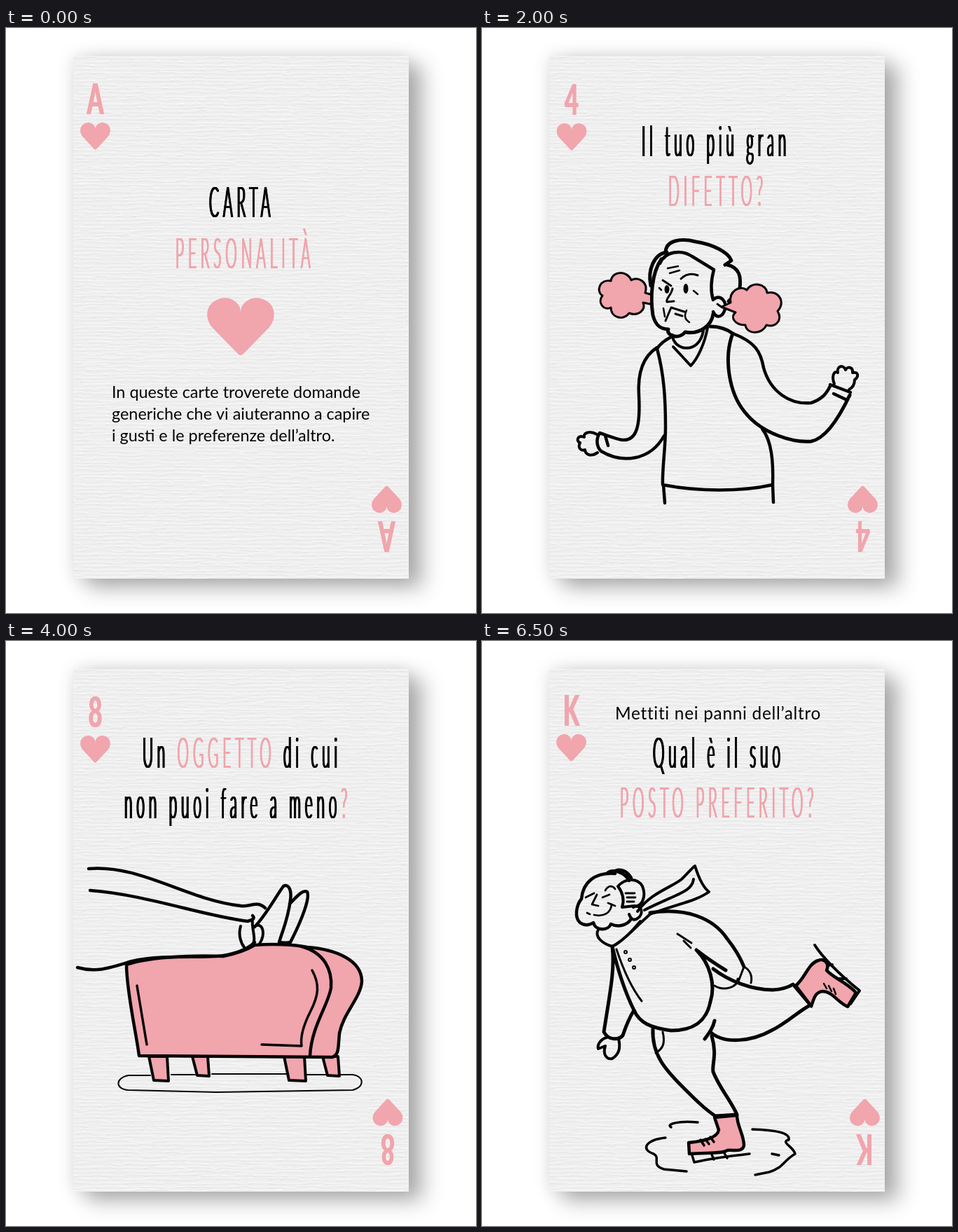
Write an HTML page with a canvas that moves like this. It is 671 px wide and 835 px high and loops after 7000 ms.

```html
<!DOCTYPE html>
<html lang="it">
<head>
<meta charset="utf-8">
<title>Carta personalità</title>
<style>
html, body { margin: 0; width: 100%; height: 100%; overflow: hidden; background: #fff; }
canvas { display: block; }
</style>
</head>
<body>
<canvas id="stage" width="671" height="835"></canvas>
<script>
const W = 671, H = 835, PINK = '#f1a5ad', BLACK = '#050505', PAPER = '#efefef';
const LOOP = 7000;
const ctx = document.getElementById('stage').getContext('2d');
const HEART = new Path2D('M48 82C46 82 44 80 42 78L8 43C-3 31 -2 14 9 6C22 -4 40 -1 47 14L48 20L49 14C56 -1 74 -4 87 6C98 14 99 31 88 43L54 78C52 80 50 82 48 82Z');

function makePaper() {
  const c = document.createElement('canvas');
  c.width = W; c.height = H;
  const g = c.getContext('2d');
  let seed = 11;
  const rnd = () => (seed = (seed * 16807) % 2147483647) / 2147483647;
  g.fillStyle = '#fff';
  g.fillRect(0, 0, W, H);
  g.fillStyle = PAPER;
  for (const [dx, dy, blur, alpha] of [[0, 0, 24, 0.12], [20, 13, 28, 0.3]]) {
    g.shadowColor = `rgba(0,0,0,${alpha})`;
    g.shadowBlur = blur;
    g.shadowOffsetX = dx;
    g.shadowOffsetY = dy;
    g.fillRect(96, 40, 479, 746);
  }
  g.shadowColor = 'transparent';
  g.beginPath();
  g.rect(96, 40, 479, 746);
  g.clip();
  // laid-paper grain: short wavy light and dark streaks
  for (let y = 40; y < 790; y += 5.5) {
    for (let x = 80; x < 575;) {
      const len = 12 + rnd() * 30, yy = y + rnd() * 3;
      for (const [dy, col] of [[0, 'rgba(255,255,255,.35)'], [2, 'rgba(200,200,200,.13)']]) {
        g.strokeStyle = col;
        g.lineWidth = 1.2 + rnd();
        g.beginPath();
        g.moveTo(x, yy + dy);
        g.quadraticCurveTo(x + len / 2, yy + dy + rnd() * 4 - 2, x + len, yy + dy + rnd() * 2 - 1);
        g.stroke();
      }
      x += len * 0.8;
    }
  }
  return c;
}

function ink(d, w = 4, fill) {
  const p = new Path2D(d);
  if (fill) { ctx.fillStyle = fill; ctx.fill(p); }
  ctx.strokeStyle = BLACK;
  ctx.lineWidth = w;
  ctx.stroke(p);
}

function oval(x, y, rx, ry = rx, w = 3, fill, turn = 0) {
  ctx.beginPath();
  ctx.ellipse(x, y, rx, ry, turn, 0, 7);
  if (fill) { ctx.fillStyle = fill; ctx.fill(); }
  if (w) { ctx.strokeStyle = BLACK; ctx.lineWidth = w; ctx.stroke(); }
}

const dot = (x, y, rx, ry = rx) => oval(x, y, rx, ry, 0, BLACK);

function peace(x, y, r, w) {
  oval(x, y, r, r, w);
  const k = r * 0.72;
  ink(`M${x} ${y - r}V${y + r}M${x - k} ${y + k}L${x} ${y + r * 0.1}L${x + k} ${y + k}`, w);
}

function heart(x, y, sx, sy) {
  ctx.save();
  ctx.translate(x, y);
  ctx.scale(sx, sy);
  ctx.fillStyle = PINK;
  ctx.fill(HEART);
  ctx.restore();
}

// condensed hand lettering: thin face, one fixed narrowing, thickened sideways
const NARROW = 0.34;

function lettering(x, y, ...runs) {
  ctx.font = '300 61px Lato, sans-serif';
  ctx.letterSpacing = '17.4px';
  ctx.textAlign = 'left';
  for (const [text, color, fat] of runs) {
    ctx.fillStyle = color;
    for (let d = -fat; d <= fat + 0.01; d += fat / 3) {
      ctx.save();
      ctx.translate(x + d, y);
      ctx.scale(NARROW, 1);
      ctx.fillText(text, 0, 0);
      ctx.restore();
    }
    x += ctx.measureText(text).width * NARROW;
  }
  ctx.letterSpacing = '0px';
}

const black = t => [t, BLACK, 0.95];
const pink = t => [t, PINK, 0.75];

function body(text, x, y, size = 23.4, gap = 0) {
  ctx.font = `400 ${size}px Lato, sans-serif`;
  ctx.letterSpacing = gap + 'px';
  ctx.textAlign = 'left';
  ctx.fillStyle = BLACK;
  ctx.fillText(text, x, y);
  ctx.letterSpacing = '0px';
}

const hint = (x, y) => body('Mettiti nei panni dell’altro', x, y, 24.4, 0.7);

function corner(rank, x, y, flip) {
  ctx.save();
  ctx.translate(x, y);
  if (flip) ctx.rotate(Math.PI);
  heart(-21.5, 0, 0.448, 0.47);
  ctx.font = '700 61px Lato, sans-serif';
  ctx.textAlign = 'center';
  ctx.fillStyle = PINK;
  ctx.scale(0.55, 1);
  for (const d of [-1.5, 0, 1.5]) ctx.fillText(rank, d, -12);
  ctx.restore();
}

function ace() {
  lettering(290, 270, black('CARTA'));
  lettering(242, 343, pink('PERSONALITÀ'));
  heart(287, 385, 1, 1);
  body('In queste carte troverete domande', 151, 528);
  body('generiche che vi aiuteranno a capire', 151, 559);
  body('i gusti e le preferenze dell’altro.', 151, 590);
}

function armchair() {
  ink('M203 259C160 262 130 300 131 350C132 385 142 410 152 426M192 381L190 406M373 360L375 392', 3);
  ink('M290 519C250 514 215 502 175 501C150 499 138 480 139 458C141 425 160 405 190 406C225 409 260 426 300 429', 3);
  oval(290, 474, 45, 46);
  oval(504, 455, 38);
  ink('M377 398C425 394 475 404 514 417', 3);
  ink('M304 420C345 395 395 400 425 420C437 428 446 436 455 442', 4.5);
  ink('M214 284C190 305 180 345 187 375C195 400 225 408 250 398C265 392 275 385 282 379', 4.5);
  ink('M222 329C232 335 238 344 238 352C252 362 268 364 279 362M238 352L228 356', 3.5);
  ink('M280 362C282 352 293 350 298 357C302 364 300 370 306 380C302 382 299 378 296 374C296 382 300 388 294 389C288 388 286 382 284 386C278 382 277 372 280 362', 3.5);
  ink('M214 280C200 280 196 266 206 260C194 250 198 240 210 236C204 222 212 208 224 206C226 194 236 190 245 194C246 178 264 174 274 183C290 172 312 180 313 192C330 190 336 208 326 218C334 226 328 236 326 240', 4.5);
  ink('M326 240C331 255 330 272 318 278C308 284 296 284 284 283C265 284 240 280 233 268M235 240C222 232 216 248 222 258C226 266 232 270 235 262', 3.5);
  ink('M236 240C242 232 240 222 252 222C262 236 280 230 290 222C302 220 312 218 318 228M253 240L263 239M311 237L324 235', 3);
  oval(272, 239, 9, 9, 2.5);
  oval(301, 238, 10, 10, 2.5);
  dot(277, 238, 3, 4); dot(304, 236, 3, 4); dot(232, 265, 4);
  ink('M264 230L280 228M293 222L306 230M290 246L297 262L286 255M279 271L280 261L299 265', 3);
  ink('M216 280C212 296 225 306 238 300C235 316 255 325 268 318C275 330 292 330 298 318M316 320C330 318 342 304 338 290C348 284 344 276 338 274L324 275', 4);
  ink('M300 328L304 352L312 344C318 360 328 360 326 344L318 326M302 282C307 292 303 302 306 312M294 284L304 300', 3);
  oval(308, 320, 11, 8);
  ink('M338 274C350 292 358 312 364 335C366 348 360 360 354 368C364 378 372 390 378 404', 5);
  ink('M344 280C368 292 388 310 412 324M364 356C390 360 415 352 429 338', 3.5);
  ink('M398 241C414 266 424 288 423 312', 3.5);
  ink('M413 324C412 312 424 308 430 311C440 308 440 316 437 322C442 330 436 338 428 342C426 334 424 330 420 328', 3.5);
  ink('M367 202C372 194 392 190 398 193L412 236C405 242 386 246 380 244Z', 4, PINK);
  ink('M375 200L387 242M383 197L395 242M391 195L404 239', 2.5);
  ink('M222 110C226 124 232 134 238 143M243 149C252 160 262 166 273 169', 2);
  ctx.setLineDash([20, 11]);
  ink('M339 200L357 202M409 204C440 206 462 186 474 158', 2.5);
  ink('M473 150C478 106 460 72 437 73C415 76 407 100 415 118C424 140 450 152 480 154', 4);
  ctx.setLineDash([]);
  ink('M450 146C460 152 470 154 491 153M499 152L513 151', 2);
  oval(515, 141, 6, 11, 3, PINK, -0.6);
  oval(525, 137, 5, 11, 3, PINK, -0.1);
  oval(528, 150, 13, 7, 3, PINK, -0.1);
  lettering(181, 614, black('Cosa ti '), pink('INFASTIDISCE'));
  lettering(223, 685, black('maggiormente'), pink('?'));
}

function fury() {
  ink('M262 321C262 302 285 300 305 305C330 309 352 320 356 332L347 338M264 320C246 322 236 345 241 368M350 338C368 342 370 355 368 372C364 380 358 384 352 390', 5);
  ink('M256 330C242 350 240 385 244 410C248 426 256 430 266 430C262 438 280 446 290 434C310 438 328 425 330 408', 5);
  ink('M254 336C262 318 285 316 300 326L331 345C327 360 326 375 330 388C340 378 352 392 346 404C342 414 334 414 330 405', 4.5);
  ink('M258 360L270 368M284 358C292 350 300 350 308 353M272 372C270 382 262 386 264 391L274 390M262 418L270 399L289 405M276 408L286 411M336 394L343 399', 3);
  ink('M265 343L280 340M268 350L282 346M259 400L261 412M302 375L308 380M292 403C288 412 290 416 296 420M253 371L256 374', 2.5);
  dot(264, 373, 3.5, 6); dot(291, 372, 3.5, 7);
  ink('M240 380L233 378C238 362 222 354 213 360C208 346 186 346 184 361C168 358 162 376 172 382C164 392 174 404 184 399C184 414 202 418 210 407C224 412 234 402 230 392L240 394', 3, PINK);
  ink('M342 398L355 392C352 376 368 366 378 374C384 362 406 364 407 378C424 374 434 392 422 404C430 418 418 428 406 424C400 438 378 438 376 424C360 424 354 412 362 406Z', 3, PINK);
  ink('M272 438C272 460 310 468 316 432M273 455L298 482C308 472 318 450 322 428');
  ink('M272 440C262 445 254 450 250 458C260 495 262 530 262 570C262 600 257 630 258 652C310 662 370 662 415 652M259 652L261 678M415 652L416 677', 4.5);
  ink('M250 456C228 470 222 495 224 525C226 565 222 590 200 588C190 586 180 582 168 578C162 588 164 598 170 604C200 622 240 618 260 582M176 582L180 596', 4.5);
  ink('M164 580C154 574 144 578 146 584C136 580 134 590 140 592C136 600 142 604 147 602C148 610 156 612 165 606');
  ink('M326 426C340 426 350 430 358 436C345 470 352 520 375 548C400 580 445 592 470 590C490 586 508 560 525 524', 5);
  ink('M358 436C390 448 398 462 402 485C412 520 440 538 470 535C485 530 492 522 497 511M497 509L526 520M502 522L519 530M400 572C414 590 416 620 415 652', 4.5);
  ink('M503 508C499 498 502 488 508 492C506 482 516 480 519 488C522 482 530 484 529 492C538 490 538 498 532 502C532 510 528 514 524 516');
  lettering(228, 183, black('Il tuo più gran'));
  lettering(266, 254, pink('DIFETTO?'));
}

function hippie() {
  ink('M292 176C280 205 268 240 249 258C260 266 272 268 279 266C276 280 270 288 262 293C285 300 302 296 311 285', 4.5);
  ink('M302 172C300 195 300 210 302 230C304 250 312 258 322 262C334 270 345 250 360 262C380 268 396 250 398 220M298 200C286 196 284 214 288 222C292 230 298 230 302 226M400 178L402 248M388 292C396 300 404 302 410 300L406 288', 3.5);
  ink('M286 150C288 120 315 102 345 102C375 102 402 122 407 160M345 121L353 128', 4.5);
  ink('M415 185C430 175 440 190 439 215C440 250 446 280 454 297L444 309L412 292C412 265 404 240 410 210Z', 4.5, PINK);
  ink('M287 148C315 146 332 128 354 128C380 130 400 142 407 160L411 184C380 160 325 160 289 174Z', 4, PINK);
  ink('M408 174C420 170 424 180 415 185', 4, PINK);
  peace(347, 145, 12, 2);
  ink('M295 222L292 246M397 224L396 252', 2.5);
  dot(292, 254, 7.5); dot(396, 260, 7.5);
  dot(327, 188, 5, 9); dot(370, 188, 5, 9);
  ink('M316 177C322 170 328 170 334 173M362 173C368 168 376 170 381 175M345 213C353 218 364 211 356 203L348 201', 3);
  ink('M311 188L318 190M311 194L318 194M384 190L392 188M384 194L391 194M328 216L324 232M374 216L379 232', 2);
  ink('M329 230C340 222 360 222 370 230C362 236 340 236 329 230Z', 2.5, BLACK);
  ink('M311 258L311 292M383 258L384 292M303 298C320 322 372 322 390 300', 3.5);
  ink('M303 298C300 330 320 360 338 360C365 358 385 330 391 298', 6);
  peace(337, 393, 30, 3.5);
  ink('M303 298C270 298 248 310 238 330C225 350 216 370 210 390M176 304L210 388L215 417M145 314C152 350 158 400 164 440C168 470 180 485 198 484C225 480 250 440 266 420M268 390L266 425C270 460 268 490 268 524', 5);
  ink('M144 316C155 306 168 304 180 304M142 308C134 290 134 276 146 268L131 240C136 234 142 238 146 245L152 262L151 240C158 234 162 240 161 248L162 266C176 262 186 268 186 278C184 290 178 292 174 303M152 278C156 268 172 272 168 282C162 290 152 288 156 294', 4);
  ink('M436 306C470 320 476 360 476 400L477 522M427 392L429 410L440 402M429 408C426 440 426 490 427 526', 5);
  lettering(255, 619, black('In che cosa'));
  lettering(285, 691, pink('CREDI?'));
}

function footstool() {
  ink('M206 620H175C155 624 156 640 175 641L300 644C380 643 450 642 495 641C512 636 512 622 495 619H478M426 619H457M294 618H400M236 619H270', 2);
  for (const [x, w, y] of [[204, 28, 627], [266, 24, 620], [397, 31, 627], [452, 24, 620]])
    ink(`M${x} 593L${x + 7} ${y}L${x + w} ${y + 1}L${x + w - 2} 593Z`, 4, PINK);
  ink('M172 462C200 452 260 448 310 450C330 446 345 440 355 434C380 432 410 433 430 437C470 440 508 455 508 486C506 510 482 530 476 560C474 580 476 590 466 594L190 592C186 560 172 500 172 462Z', 4.5, PINK);
  ink('M422 436C455 445 466 470 464 495C460 520 436 550 434 592', 4.5);
  ink('M437 470C448 490 447 505 434 530C424 550 420 565 422 578L365 576M187 492L201 576', 3.5);
  ink('M118 325C190 318 260 370 335 378C348 380 358 370 370 381M120 356C200 362 280 392 345 400C352 398 356 396 352 392M102 466C130 474 150 466 180 457C220 448 270 452 300 450C325 448 345 440 355 430', 4.5);
  ink('M335 407C331 420 336 432 340 437M352 397C350 410 358 425 352 434M358 406C368 404 370 420 362 432', 4);
  ink('M405 375C415 365 424 354 430 358C434 366 424 395 406 430C400 432 394 430 390 430', 4.5);
  ink('M355 408C372 390 385 365 396 350C404 346 408 356 406 370C402 400 394 415 390 430', 4.5);
  lettering(195, 181, black('Un '), pink('OGGETTO'), black(' di cui'));
  lettering(169, 253, black('non puoi fare a meno'), pink('?'));
}

function coffee() {
  ink('M248 330L237 270L302 266M410 264L490 264L481 330M158 456C144 460 144 480 152 495M510 452C528 454 528 470 528 496', 2.5);
  ink('M302 246C285 240 280 205 298 196C306 190 314 192 318 192M312 196C322 172 366 172 380 194M376 194C400 180 422 208 406 236', 5);
  ink('M302 240C298 252 304 266 316 268C320 280 314 290 322 292C326 308 350 305 352 302C362 312 380 306 384 292C394 285 398 275 397 262', 4.5);
  ink('M306 248C303 225 304 205 320 198C345 186 375 190 388 210C396 222 398 240 398 250M398 240C408 236 412 242 411 250C410 260 402 264 396 260', 4);
  oval(344, 246, 8, 8, 2.5); oval(364, 242, 8, 8, 2.5);
  dot(331, 245, 3, 5); dot(347, 246, 2.5, 4); dot(367, 241, 2.5, 4);
  ink('M317 233L328 226L330 232ZM362 223L373 217L376 222Z', 3.5);
  ink('M352 245L356 243M355 250L361 263L350 265M338 277C346 282 358 282 366 275M346 280C350 285 358 285 362 278', 2.5);
  ink('M331 266C326 274 330 284 338 288M378 262C384 272 380 282 374 288M318 244L311 242M318 250L312 250M379 236L388 232M380 241L388 240', 2);
  ink('M322 304C290 310 255 325 232 345C215 370 160 385 140 410C120 430 128 452 170 457C215 455 240 425 248 405M386 300C425 305 470 320 486 340C505 370 520 405 531 430C536 448 520 460 502 462', 5);
  ink('M322 304C326 330 340 345 346 362L348 455M384 298C386 320 375 345 348 362M381 398L435 396C436 420 432 440 412 443C390 446 382 430 381 398', 2.5);
  for (const y of [366, 379, 392, 406, 427]) dot(358, y, 2);
  ink('M435 370L450 390M448 358C452 390 450 415 458 438M178 400L212 398L202 390', 3);
  ink('M452 442C465 430 495 430 506 440C512 455 496 468 480 470C470 476 462 468 458 474C450 482 445 476 446 470C438 474 430 466 440 460C432 458 434 452 444 454', 3.5);
  ink('M252 408C246 440 242 468 256 468C310 444 370 470 430 501C443 506 444 486 452 476M252 483C300 455 370 470 420 508', 4.5);
  ink('M284 462L287 470M296 459L299 467M322 458L324 467L345 470L346 461M372 469L369 480M382 473L378 484', 3);
  ink('M223 408C212 395 220 375 235 370C250 358 268 362 274 372C284 380 278 392 272 402C276 410 268 414 262 408C250 420 232 420 223 408', 3.5);
  ink('M287 368C274 364 272 376 278 382C276 396 280 402 286 400', 4, PINK);
  ink('M288 362C290 352 328 350 332 362L329 418C328 428 284 428 284 416Z', 4.5, PINK);
  ink('M288 361C292 370 328 369 332 361', 3.5);
  for (const x of [300, 312, 323]) ink(`M${x} 329C${x + 6} 338 ${x - 4} 342 ${x + 4} 352`, 2);
  hint(189, 557);
  lettering(243, 624, black('Qual è il suo'));
  lettering(175, 695, pink('RITUALE MATTUTINO?'));
}

function skater() {
  ink('M190 332C160 330 144 345 142 368C134 378 132 395 140 402C148 408 156 404 159 402C162 414 180 414 184 404C196 410 208 404 212 398M178 332C186 324 204 330 210 342M190 328C200 324 208 330 213 338', 4.5);
  ink('M194 350C205 338 222 338 229 350C235 365 228 380 218 378L200 380C204 368 200 358 194 350M216 380C228 374 232 390 222 396C216 400 212 396 210 390');
  ink('M205 360L218 360M207 366L219 366M207 372L217 372M148 366L160 360M176 356C180 349 186 348 190 354M164 362L157 376L166 378M172 366L182 362M150 388L154 390M160 391C174 394 184 388 185 376M180 374L190 378', 2.8);
  ink('M222 386C240 360 270 352 285 340C295 330 300 324 304 321C310 340 316 352 324 358C305 372 275 376 240 390C215 412 205 425 190 434M302 340C300 358 280 360 232 384M166 412C160 422 172 432 186 436C205 425 216 412 226 400');
  ink('M240 388C290 380 330 395 350 425C362 440 370 455 374 465', 5);
  ink('M279 418L299 431M288 428L298 438', 3);
  ink('M348 470C335 462 320 452 306 441C325 460 334 490 326 515C320 545 300 556 270 556C240 552 225 545 217 527', 5);
  ink('M186 436C190 470 182 505 174 558C180 570 195 570 201 563C206 548 212 535 217 527M186 436C194 470 206 505 217 527', 5);
  ink('M192 440C202 470 214 496 228 514', 3);
  for (const [x, y] of [[205, 444], [211, 455], [217, 466]]) oval(x, y, 2, 2, 2);
  ink('M178 566C170 568 164 576 166 582L176 578C172 590 178 598 186 596C196 590 198 580 195 568');
  ink('M330 468C352 485 385 498 415 498C430 497 438 494 444 490L470 521M332 542C330 552 324 560 318 568M326 558C345 576 385 572 415 555C435 545 450 530 468 520', 5);
  ink('M332 492C345 500 365 495 365 482M374 465C384 470 386 480 384 488M374 465L366 486M258 558C262 575 258 582 248 588', 3);
  ink('M244 553C242 590 262 612 285 635C305 655 318 668 333 678L364 676C355 655 340 640 330 615C328 605 336 590 328 564', 5);
  ink('M332 680L364 677C364 692 374 705 374 720C372 730 360 726 350 727C344 732 320 730 296 732L295 716C314 714 336 710 338 698Z', 4.5, PINK);
  ink('M300 734L303 744C330 738 355 735 382 732M328 733L331 740M346 731L350 738M312 712L317 720M319 711L324 718M326 708L331 715', 3.5);
  ink('M475 434C485 450 510 476 539 499L526 518M488 464L500 462M510 482L520 482', 4);
  ink('M448 492C462 480 466 460 480 456C490 452 496 462 492 470C500 480 522 488 534 502L522 522C508 516 500 500 486 500C474 502 474 512 470 521Z', 4.5, PINK);
  ink('M488 489L492 496M495 492L499 500M502 496L505 504', 2.5);
  ink('M270 694C262 690 280 684 308 687M262 709C235 712 225 725 245 732C256 738 240 748 260 754L292 757M386 697C420 698 440 702 438 712C425 715 445 722 447 732C430 742 430 752 410 758L390 762M414 732L424 734', 3.5);
  hint(190, 112);
  lettering(244, 181, black('Qual è il suo'));
  lettering(197, 252, pink('POSTO PREFERITO?'));
}

// start time, rank, picture, top heart (x, y), bottom heart (x, y)
const deck = [
  [0, 'A', ace, 127.5, 135, 543.5, 692],
  [1000, '2', armchair, 130, 138, 540, 686],
  [1500, '3', armchair, 128, 136, 543, 691],
  [2000, '4', fury, 128, 136, 543.5, 692],
  [2500, '5', fury, 128, 137, 543, 700],
  [3000, '6', hippie, 128.5, 137, 543.5, 692],
  [3500, '7', hippie, 127, 137, 543.5, 694],
  [4000, '8', footstool, 127.5, 135, 545, 692],
  [4500, '9', footstool, 127, 135, 545, 693],
  [5000, '10', footstool, 127, 135, 545, 695],
  [5500, 'J', coffee, 126.5, 134, 546.5, 695],
  [6000, 'Q', coffee, 127, 134, 546.5, 695],
  [6500, 'K', skater, 127.5, 133, 546.5, 692]
];

const paper = makePaper();
ctx.lineCap = ctx.lineJoin = 'round';

function frame(now) {
  const t = now % LOOP;
  const [, rank, picture, x1, y1, x2, y2] = deck.findLast(card => card[0] <= t);
  ctx.drawImage(paper, 0, 0);
  corner(rank, x1, y1);
  corner(rank, x2, y2, true);
  picture();
  requestAnimationFrame(frame);
}
frame(0);
</script>
</body>
</html>
```
